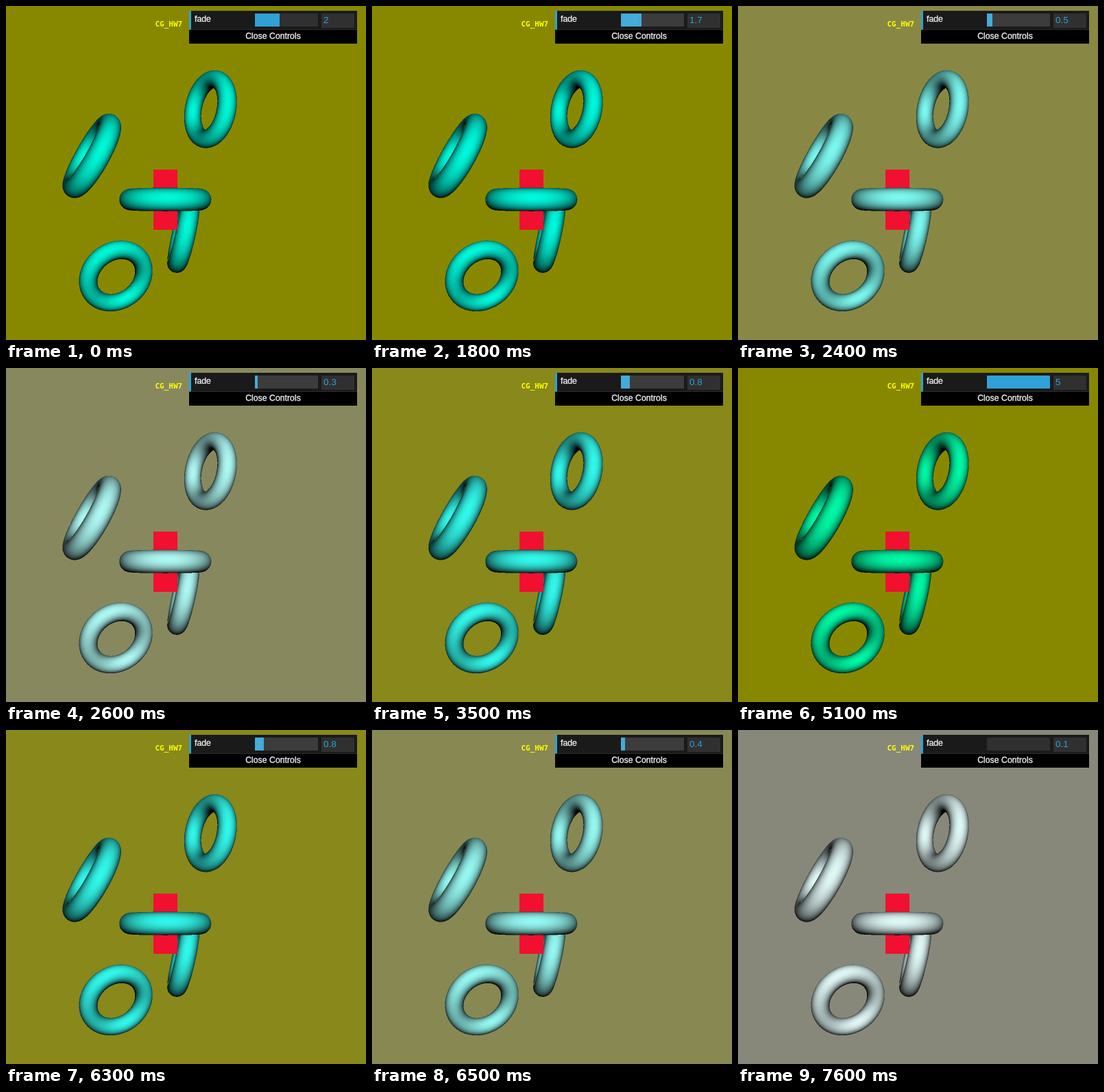
These frames come from a looping animation (525 px wide and 488 px high, 8 s). An HTML page with a canvas:

```html
<!DOCTYPE html>
<html lang="en">
<head>
<meta charset="utf-8">
<title>CG_HW7</title>
<style>
  html, body { margin: 0; width: 100%; height: 100%; overflow: hidden; background: #888800; }
  #stage { position: relative; width: 525px; height: 488px; overflow: hidden; }
  #stage * { position: absolute; box-sizing: border-box; white-space: pre; }
  canvas { left: 0; top: 0; }
  #title {
    left: 217.5px; top: 20px; color: #ff0;
    font: bold 11px/13px "DejaVu Sans Mono", monospace;
  }
  #gui {
    left: 267px; top: 7px; width: 245px; height: 48px; color: #eee;
    font: 12.3px/14px "Liberation Sans", Arial, sans-serif;
    text-shadow: 0 -1px 0 #111; -webkit-text-stroke: .35px #eee;
  }
  #row {
    left: 0; top: 0; width: 245px; height: 28px; background: #1a1a1a;
    border-left: 3px solid #2fa1d6; border-bottom: 1px solid #2c2c2c;
  }
  #label { left: 5px; top: 5px; }
  #slider { left: 93px; top: 4px; width: 92px; height: 19px; background: #303030; }
  #fill { left: 0; top: 0; height: 19px; background: #2fa1d6; }
  #slider.hover { background: #3c3c3c; }
  .hover #fill { background: #44abda; }
  #value {
    left: 190px; top: 4px; width: 48px; height: 21px; padding-left: 3px;
    background: #303030; color: #2fa1d6; font-size: 13.5px; line-height: 19px;
    text-shadow: none; -webkit-text-stroke: 0;
  }
  #close {
    left: 0; top: 28px; width: 245px; height: 20px; background: #000;
    line-height: 19px; text-align: center;
  }
  #close.hover { background: #111; }
</style>
</head>
<body>
<div id="stage">
  <canvas id="scene" width="525" height="488"></canvas>
  <div id="title">CG_HW7</div>
  <div id="gui">
    <div id="row">
      <span id="label">fade</span>
      <div id="slider"><div id="fill"></div></div>
      <div id="value"></div>
    </div>
    <div id="close">Close Controls</div>
  </div>
</div>
<script>
const W = 525, H = 488, LOOP = 8000, FOCAL = 520, RING = 10, TUBE = 3;
const $ = id => document.getElementById(id);
const ctx = $('scene').getContext('2d');
const image = ctx.createImageData(W, H);

// Weight of background, lit torus and red block in each pixel
const back = new Float32Array(W * H).fill(1);
const lit = new Float32Array(W * H);
const block = new Float32Array(W * H);

// Direction to the light; y points down and z into the screen
const toLight = [0.04, -0.2, -1];
const light = toLight.map(v => v / Math.hypot(...toLight));

// Lambert brightness where a ray meets the torus, or -1 for a miss
function shade(u, v, dist, ax, ay, az) {
  const len = Math.hypot(u, v, 1), dx = u / len, dy = v / len, dz = 1 / len;
  let t = dist - 15;
  for (let i = 0; i < 70 && t < dist + 15; i++) {
    const x = dx * t, y = dy * t, z = dz * t - dist;
    const h = x * ax + y * ay + z * az;
    const rho = Math.sqrt(Math.max(1e-9, x * x + y * y + z * z - h * h));
    const q = rho - RING, r = Math.hypot(q, h), gap = r - TUBE;
    if (gap < 0.008) {
      const part = (p, a) => ((p - a * h) / rho * q + a * h) / r;
      const n = part(x, ax) * light[0] + part(y, ay) * light[1] + part(z, az) * light[2];
      return Math.max(0, n * 0.97);
    }
    t += gap;
  }
  return -1;
}

// scale: pixels per unit, face: how far the ring faces the viewer,
// tilt: lean of the long axis from vertical, side: which flank is nearer
function torus(cx, cy, scale, face, tilt, side) {
  const a = tilt * Math.PI / 180, s = Math.sqrt(1 - face * face) * side;
  const ax = s * Math.cos(a), ay = s * Math.sin(a), dist = FOCAL / scale;
  const half = scale * 15;
  for (let y = Math.floor(cy - half); y < cy + half; y++) {
    for (let x = Math.floor(cx - half); x < cx + half; x++) {
      let cover = 0, sum = 0;
      for (let k = 0; k < 4; k++) {
        const u = (x + 0.25 + (k & 1) / 2 - cx) / FOCAL;
        const v = (y + 0.25 + (k >> 1) / 2 - cy) / FOCAL;
        const b = shade(u, v, dist, ax, ay, face);
        if (b >= 0) { cover += 0.25; sum += b / 4; }
      }
      if (!cover) continue;
      const i = y * W + x;
      back[i] *= 1 - cover;
      block[i] *= 1 - cover;
      lit[i] = lit[i] * (1 - cover) + sum;
    }
  }
}

function redBlock(x0, y0, x1, y1) {
  for (let y = y0; y < y1; y++) {
    const from = y * W + x0, to = y * W + x1;
    back.fill(0, from, to);
    lit.fill(0, from, to);
    block.fill(1, from, to);
  }
}

torus(295.7, 150.2, 4.4, 0.54, 12, 1);
torus(123.9, 218.3, 5.2, 0.17, 29.5, 1);
torus(161.5, 396.2, 4.33, 0.815, 52, -1);
torus(258, 331.8, 4.5, 0.08, 12, 1);
redBlock(215, 239, 250, 327);
torus(232.3, 282.7, 5.11, 0, 90, 1);

// Scale saturation while the strongest channel stays put
const saturate = (rgb, fade) => {
  const top = Math.max(...rgb);
  return rgb.map(c => Math.max(0, top + (c - top) * fade));
};

function paint(fade) {
  const bg = saturate([136, 136, 0], fade);
  const ring = saturate([0, 255, 238], fade);
  const red = [241, 16, 47], px = image.data;
  for (let i = 0; i < W * H; i++) {
    for (let c = 0; c < 3; c++) {
      px[i * 4 + c] = back[i] * bg[c] + lit[i] * ring[c] + block[i] * red[c];
    }
    px[i * 4 + 3] = 255;
  }
  ctx.putImageData(image, 0, 0);
}

// Drags of the slider: start time, then one value every 100 ms
const drags = [
  [0, [2]],
  [1800, [1.7, 1.4, 1.1, 0.9]],
  [2300, [0.7, 0.5, 0.4, 0.3]],
  [3500, [0.8, 0.9]],
  [3800, [1, 1.3, 1.6, 1.9, 2.3, 2.7, 3.1, 3.5, 3.8]],
  [4700, [4.1, 4.4, 4.6, 4.8, 5]],
  [5600, [4.6, 4.1, 3.5, 2.9, 2.3, 1.7, 1.2, 0.8, 0.6]],
  [6500, [0.4, 0.1]]
];
const within = (t, spans) => spans.some(([a, b]) => t >= a && t < b);

function fadeAt(t) {
  const [start, values] = drags.filter(d => d[0] <= t).pop();
  return values[Math.min(values.length - 1, Math.floor((t - start) / 100))];
}

let shown = null;
function frame() {
  const t = performance.now() % LOOP, fade = fadeAt(t);
  if (fade !== shown) {
    paint(fade);
    $('value').textContent = fade;
    $('fill').style.width = (fade - 0.1) / 4.9 * 92 + 'px';
    shown = fade;
  }
  $('slider').classList.toggle('hover', within(t, [[700, 800], [900, 5100], [5600, 7500]]));
  $('close').classList.toggle('hover', within(t, [[7500, 7600]]));
  requestAnimationFrame(frame);
}
frame();
</script>
</body>
</html>
```
